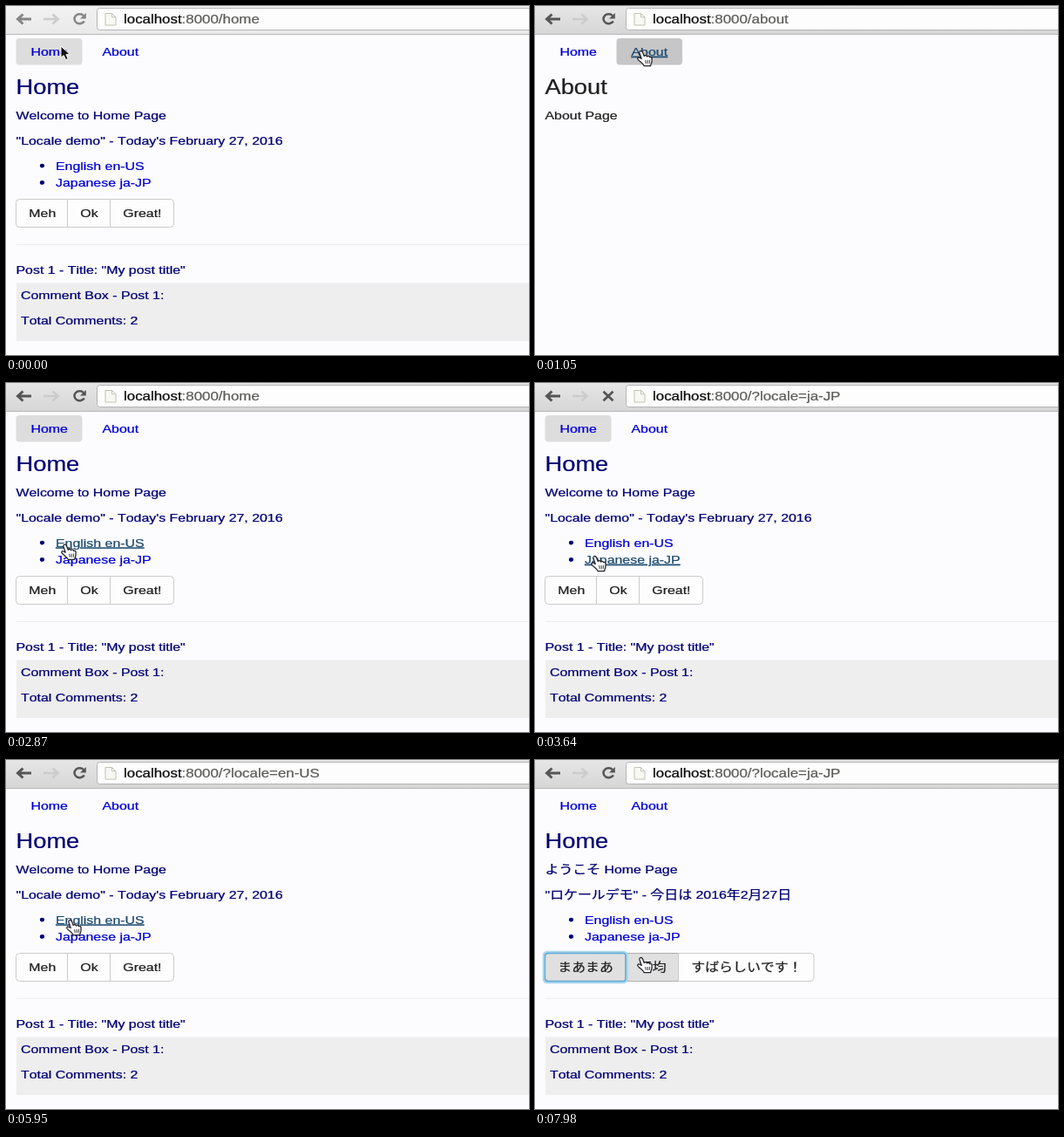
Write an HTML page that moves like this. It is 600 by 400 pixels and loops after 8 s.

```html
<!DOCTYPE html>
<html lang="en">
<head>
<meta charset="utf-8">
<title>Locale demo</title>
<style>
html, body { margin: 0; width: 100%; height: 100%; overflow: hidden; background: #fcfcfe; }
svg { display: block; width: 100%; height: 100%; }
text {
  font-family: "Liberation Sans", "Noto Sans CJK JP", "Noto Sans CJK", sans-serif;
  font-kerning: none;
  white-space: pre;
}
text, tspan { fill: currentColor; stroke: currentColor; stroke-width: .25px; }
</style>
</head>
<body>
<svg id="stage" viewBox="0 0 600 400"></svg>
<script>
const LOOP = 8000;
const NAVY = '#000074', INK = '#202020', LINK = '#0000d4', HOVER = '#1c4a70';
const EDGE = '#cbcbcb', GREY = '#dddddd';
const stage = document.getElementById('stage');

function add(parent, tag, attrs = {}, content) {
  const node = document.createElementNS('http://www.w3.org/2000/svg', tag);
  set(node, attrs);
  if (content !== undefined) node.textContent = content;
  parent.appendChild(node);
  return node;
}
function set(node, attrs) {
  for (const k in attrs) node.setAttribute(k, attrs[k]);
}
const show = (node, on) => node.setAttribute('display', on ? 'inline' : 'none');
const group = parent => add(parent, 'g');
const rect = (parent, x, y, width, height, attrs) =>
  add(parent, 'rect', { x, y, width, height, ...attrs });
const line = (parent, d, stroke, width) =>
  add(parent, 'path', { d, stroke, 'stroke-width': width, fill: 'none' });

const label = (parent, x, y, content, color = NAVY, size = 14) =>
  add(parent, 'text', {
    transform: `translate(${x} ${y}) scale(1.137 .97)`, 'font-size': size, color
  }, content);

const defs = add(stage, 'defs');
function gradient(id, top, bottom) {
  const g = add(defs, 'linearGradient', { id, x1: 0, y1: 0, x2: 0, y2: 1 });
  add(g, 'stop', { offset: 0, 'stop-color': top });
  add(g, 'stop', { offset: 1, 'stop-color': bottom });
}
gradient('active', '#e6e6e6', '#d6d6d6');
gradient('idle', '#f2f2f2', '#e9e9e9');
rect(stage, 0, 0, 600, 400, { fill: '#fcfcfe' });

// Browser bar
const bar = rect(stage, 0, 0, 600, 32.5);
rect(stage, 0, 32, 600, 1, { fill: '#b8b8b8' });
const back = line(stage, 'M29 15H14M19.5 9.5L13.5 15L19.5 20.5', '', 3);
line(stage, 'M43 15H58M53.5 9.5L59.5 15L53.5 20.5', '#cccccc', 2.6);
const reload = group(stage);
const arc = line(reload, 'M89 11.2A6 5.4 0 1 0 89.8 17.3', '', 2.5);
const arcTip = add(reload, 'path', { d: 'M91.8 8V14.4H85Z' });
const stop = line(stage, 'M78.5 9.8L89.5 20.2M89.5 9.8L78.5 20.2', '#555555', 2.8);
rect(stage, 104.5, 2.5, 510, 25, { rx: 3, fill: '#fdfdfe', stroke: '#b4b4b4' });
add(stage, 'path', {
  d: 'M114 8.5H121.5L126 12.8V22H114ZM121.5 8.5V12.8H126', fill: '#f8f8f4', stroke: '#c2c2b4'
});
const address = label(stage, 135, 20.3, '', '#0a0a0a', 14.85);
add(address, 'tspan', {}, 'localhost');
const path = add(address, 'tspan', { color: '#5c5c58' });

// Navigation
function navItem(x, width, name) {
  const pill = rect(stage, x, 37, width, 30.5, { rx: 4 });
  return { pill, text: label(stage, x + 17, 56.8, name, LINK), box: [x, 37, width, 30.5] };
}
const homeNav = navItem(11.5, 76, 'Home');
const aboutNav = navItem(93.5, 75.5, 'About');

// About page
const about = group(stage);
label(about, 11.5, 101, 'About', INK, 24);
label(about, 11.5, 129.6, 'About Page', INK);

// Home page
const home = group(stage);
label(home, 11.5, 101, 'Home', NAVY, 24);
const links = ['English en-US', 'Japanese ja-JP'].map((name, i) => {
  const y = 187.5 + i * 19.3;
  add(home, 'ellipse', { cx: 41.5, cy: y - 4.4, rx: 2.6, ry: 2.3, fill: NAVY });
  return { text: label(home, 57, y, name, LINK), box: [57, y - 13, i ? 110 : 102, 18] };
});

function button(parent, x, end, name, first, last) {
  const l = first ? 4 : 0, r = last ? 4 : 0;
  const d = `M${x + l} 221.5H${end - r}q${r} 0 ${r} ${r}V${253.5 - r}q0 ${r} ${-r} ${r}` +
    `H${x + l}q${-l} 0 ${-l} ${-l}V${221.5 + l}q0 ${-l} ${l} ${-l}Z`;
  const shape = add(parent, 'path', { d, stroke: EDGE });
  label(parent, x + 14.8, 242.4, name, INK);
  return { shape, box: [x, 221, end - x, 33] };
}
function locale(welcome, today, names, edges) {
  const g = group(home);
  label(g, 11.5, 129.6, welcome);
  label(g, 11.5, 158.6, today);
  const buttons = names.map((name, i) => button(g, edges[i], edges[i + 1], name, i === 0, i === 2));
  return { g, buttons };
}
const english = locale('Welcome to Home Page', '"Locale demo" - Today\'s February 27, 2016',
  ['Meh', 'Ok', 'Great!'], [11.5, 70.5, 119.5, 192.5]);
const japanese = locale('ようこそ Home Page', '"ロケールデモ" - 今日は 2016年2月27日',
  ['まあまあ', '平均', 'すばらしいです！'], [11.5, 104, 164.5, 320]);
japanese.g.setAttribute('lang', 'ja');
const ring = group(home);
rect(ring, 10, 220, 95.5, 35, { rx: 4, fill: 'none', stroke: '#a9d6ee', 'stroke-width': 2.5 });
rect(ring, 11.5, 221.5, 92.5, 32, { rx: 3, fill: 'none', stroke: '#5fa9d6', 'stroke-width': 1.3 });

rect(home, 12, 272.8, 588, 1, { fill: '#ebebeb' });
rect(home, 12, 317.5, 588, 66.5, { fill: '#eeeeee' });
const title = label(home, 11.5, 307.4, '');
label(home, 17, 336.2, 'Comment Box - Post 1:');
const total = label(home, 17, 365.2, '');

// Pointers, with the hot spot at 0,0
const arrow = add(stage, 'path', {
  d: 'M0 0V13.2L3.2 10.5L5.6 15.6L8.2 14.5L5.9 9.6H10.3Z',
  fill: '#101010', stroke: '#fdfdfd', 'stroke-width': 1
});
const hand = group(stage);
add(hand, 'path', {
  d: 'M-2.2 1.4C-2.4-.8 .6-1.2 1.4 .8L3.3 5.6C3.9 4.3 6 4.4 6.5 6C7.4 4.8 9.2 5.1 9.6 6.7' +
    'C10.7 6 12 6.6 12.1 8.1L12 11.5C11.9 13.5 10.6 14.6 10.6 16.7H3.3C2.3 14-1 12.2-3.6 9.6' +
    'C-5.2 7.7-3.6 6.4-1.9 7.3L.2 8.5Z',
  fill: '#fdfdfd', stroke: '#24242a', 'stroke-width': 1.3, 'stroke-linejoin': 'round'
});
line(hand, 'M4.6 10.2L5.3 14M7 10L7.4 14M9.4 9.8V13.8', '#24242a', .9);

// Pointer stops: time, x, y
const stops = [
  [0, 63, 46], [350, 63, 46], [780, 122, 52], [1300, 122, 52], [1700, 58, 50], [2300, 58, 50],
  [3000, 69, 199], [3800, 69, 199], [4100, 71, 222], [4500, 71, 222], [4800, 122, 227],
  [5050, 122, 227], [5500, 74, 184], [6000, 74, 184], [6300, 72, 201],
  [6700, 72, 201], [7000, 71, 222], [7480, 71, 222], [7850, 122, 227], [LOOP, 122, 227]
];
function pointer(t) {
  const i = stops.findIndex(s => s[0] > t);
  const [t0, x0, y0] = stops[i - 1], [t1, x1, y1] = stops[i];
  const p = (t - t0) / (t1 - t0), e = p * p * (3 - 2 * p);
  return [x0 + (x1 - x0) * e, y0 + (y1 - y0) * e];
}

function update(t) {
  const within = (a, b) => t >= a && t < b;
  const focused = t >= 280;
  const onAbout = within(910, 1820);
  const inJapanese = within(3780, 5740) || t >= 6580;
  const loading = within(3570, 3780) || within(5600, 5740) || within(6440, 6580);
  const empty = within(1820, 2240);
  const pressed = within(4270, 5040) || t >= 7420;
  const [px, py] = pointer(t);
  const over = ({ box: [x, y, w, h] }) =>
    focused && px >= x && px < x + w && py >= y && py < y + h;

  bar.setAttribute('fill', focused ? 'url(#active)' : 'url(#idle)');
  const icon = focused ? '#555555' : '#858585';
  set(back, { stroke: icon });
  set(arc, { stroke: icon });
  set(arcTip, { fill: icon });
  show(reload, !loading);
  show(stop, loading);
  path.textContent = ':8000/' + (onAbout ? 'about' : t < 3570 ? 'home' :
    within(5600, 6440) ? '?locale=en-US' : '?locale=ja-JP');

  const paintLink = (text, hot) => set(text, {
    color: hot ? HOVER : LINK, 'text-decoration': hot ? 'underline' : 'none'
  });
  const homeActive = t < 3780 && !onAbout;
  set(homeNav.pill, { fill: homeActive || over(homeNav) ? GREY : 'none' });
  set(aboutNav.pill, { fill: onAbout ? '#c6c6c6' : over(aboutNav) ? GREY : 'none' });
  for (const item of [homeNav, aboutNav, ...links]) paintLink(item.text, over(item));

  show(about, onAbout);
  show(home, !onAbout);
  show(english.g, !inJapanese);
  show(japanese.g, inJapanese);
  show(ring, pressed);
  const { buttons } = inJapanese ? japanese : english;
  buttons.forEach((b, i) => {
    const lit = over(b) || (i === 0 && pressed);
    set(b.shape, { fill: lit ? '#e0e0e0' : '#fdfdfe', stroke: lit ? '#adadad' : EDGE });
  });
  title.textContent = `Post 1 - Title: "${empty ? '' : 'My post title'}"`;
  total.textContent = 'Total Comments:' + (empty ? '' : ' 2');

  const targets = [homeNav, aboutNav, ...(onAbout ? [] : [...links, ...buttons])];
  const pointing = targets.some(over);
  show(hand, pointing);
  show(arrow, !pointing);
  set(pointing ? hand : arrow, { transform: `translate(${px} ${py})` });
}

const start = performance.now();
function tick(now) {
  update(Math.max(0, now - start) % LOOP);
  requestAnimationFrame(tick);
}
update(0);
requestAnimationFrame(tick);
</script>
</body>
</html>
```
